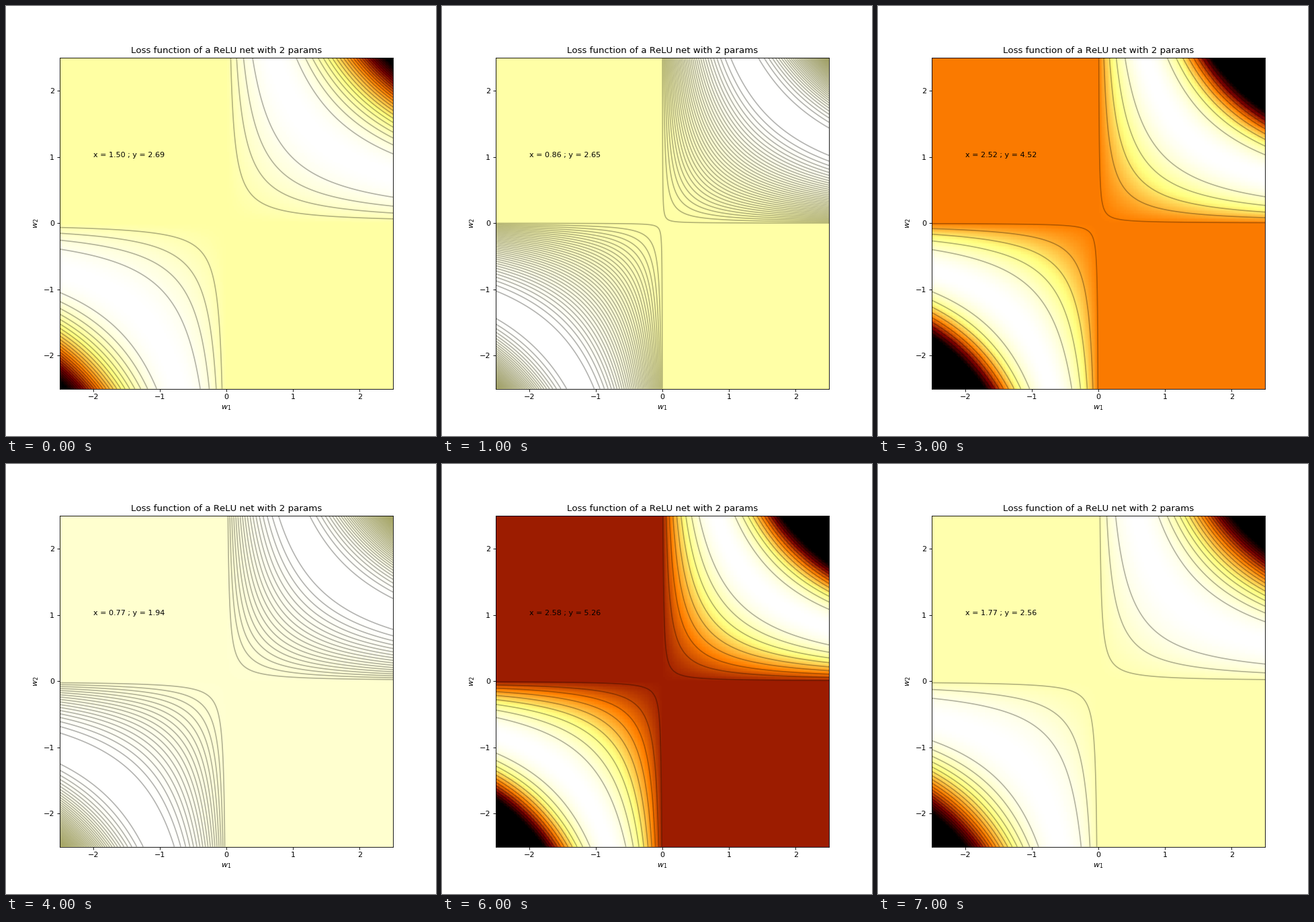
These frames come from a looping animation (640 by 640 pixels, 8000 ms). A matplotlib script:

```python
import numpy as np
import matplotlib.pyplot as plt
from matplotlib.animation import FuncAnimation

FRAMES = 8
POINTS = 30
LIM = 2.5

plt.rcParams["text.kerning_factor"] = 6

# Noisy points around the line y = 2x, one shown per frame.
rng = np.random.RandomState(42)
xs = 1 + rng.randn(POINTS)
ys = 2 * xs + 0.5 * rng.randn(POINTS)

w = np.linspace(-LIM, LIM, 201)
w1, w2 = np.meshgrid(w, w)


def loss(x, y):
    return (y - np.maximum(w1 * w2 * x, 0)) ** 2


fig, ax = plt.subplots(figsize=(8, 8), dpi=80)
image = ax.imshow(loss(xs[0], ys[0]), cmap="afmhot_r", vmin=0, vmax=40,
                  extent=(-LIM, LIM, -LIM, LIM), origin="lower",
                  aspect="auto", interpolation="nearest")
label = ax.text(-2, 1, "", zorder=5)
ax.set_title("Loss function of a ReLU net with 2 params")
ax.set_xlabel("$w_1$")
ax.set_ylabel("$w_2$")
ax.set_xticks(range(-2, 3))
ax.set_yticks(range(-2, 3))
lines = []


def draw(i):
    x, y = xs[i], ys[i]
    z = loss(x, y)
    image.set_data(z)
    while lines:
        lines.pop().remove()
    lines.append(ax.contour(w1, w2, z, 40, colors="black",
                            alpha=0.3, linewidths=1.5))
    ax.set_xlim(-LIM, LIM)
    ax.set_ylim(-LIM, LIM)
    label.set_text(f"x = {x:.2f} ; y = {y:.2f}")
    return []


anim = FuncAnimation(fig, draw, frames=FRAMES, interval=1000,
                     init_func=lambda: draw(0), repeat=True, repeat_delay=0)
plt.show()
```
